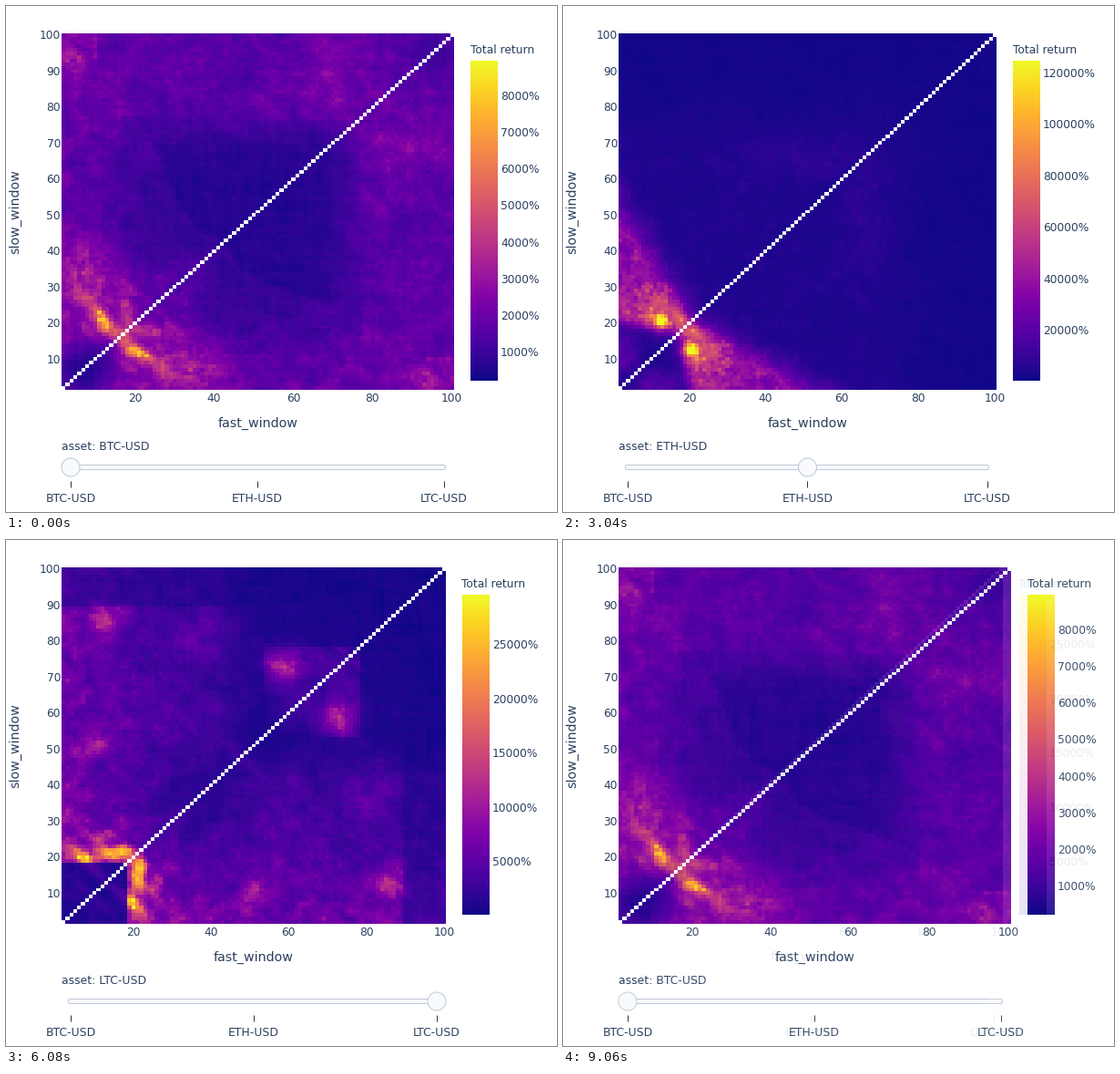
A matplotlib script for the animation above (9.12 s loop, 605 px wide and 555 px high).

```python
import numpy as np
import matplotlib.pyplot as plt
from matplotlib.animation import FuncAnimation
from matplotlib.patches import Circle, FancyBboxPatch

W, H, DPI = 605, 555, 100
PX = 72 / DPI
LOOP, TICK = 9120, 20
FADES, STEP, STEPS = (2500, 5540, 8580), 60, 10
INK, RAIL, LINE = "#2a3f5f", "#f8fafc", "#bec8d9"
LEFT, TOP, BOTTOM = 61, 30, 421
BAR_TOP, BAR_BOTTOM = 60, 411
ASSETS = ("BTC-USD", "ETH-USD", "LTC-USD")

plt.rcParams["font.family"] = "DejaVu Sans"
N = 99
X, Y = np.meshgrid(np.arange(2, N + 2), np.arange(2, N + 2))
rng = np.random.default_rng(7)


def sig(d, width):
    return 1 / (1 + np.exp(-np.clip(d / width, -40, 40)))


def hill(x, y, sx, sy, power=2):
    return np.exp(-np.abs((X - x) / sx) ** power - np.abs((Y - y) / sy) ** power)


def smooth(a, r, axis):
    k = np.hanning(2 * r + 3)[1:-1]
    return np.apply_along_axis(np.convolve, axis, a, k, mode="same")


def noise(rx, ry):
    a = rng.normal(size=(N + 60, N + 60))
    a = smooth(smooth(a, rx, 1), ry, 0)[30:-30, 30:-30]
    return a / a.std()


def waves(r):
    """Ripples running across the diagonal."""
    w = smooth(rng.normal(size=260), r, 0)
    return (w / w.std())[X + Y + 20]


def finish(z, grain, clump, streak):
    """Add texture, then mirror the upper half across the diagonal."""
    rough = 0.6 * (noise(0, 0) + noise(1, 1))
    cloud = 0.8 * noise(3, 3) + 0.4 * waves(2) * noise(8, 8)
    z = z * np.exp(grain * rough + clump * cloud)
    z = np.clip(z + streak * (noise(0, 9) + noise(9, 0)), 0, 1)
    return np.where(X < Y, z, z.T)


def btc():
    edge = np.interp(Y, [42, 46, 66, 88, 92], [44, 35, 26, 16, 10])
    basin = hill(50, 54, 42, 22, 4) * (0.7 + 0.3 * (Y < 76.5))
    z = 0.19 - 0.12 * basin - 0.03 * (X > edge)
    z += 0.1 * hill(5, 96, 4, 10) + 0.06 * hill(70, 88, 9, 12) - 0.06 * hill(95, 97, 9, 8)
    # bright lobe with a crest falling towards the diagonal
    z += 0.2 * hill(8, 30, 8, 13) + 0.2 * hill(18, 25, 2, 7) + 0.35 * hill(16.5, 18, 2.5, 2)
    z += 0.58 * np.exp(-((X + Y - 33) / 2.6) ** 2 - ((X - 11.5) / 3.5) ** 2)
    z -= 0.16 * hill(8, 9, 8, 6)
    return finish(z, 0.13, 0.1, 0.005)


def eth():
    inside = 31.4 - 0.52 * Y - X
    lobe = sig(inside, 1.8) * sig(Y - 21 + X / 4, 0.9)
    z = 0.01 + 0.02 * sig(78 - Y, 4) + 0.03 * hill(50, 66, 16, 6)
    z += lobe * (0.17 + 0.16 * sig(40 - Y, 5)) + 0.12 * hill(3, 12, 4, 6)
    z += 0.5 * hill(13, 20.5, 2, 1.4) + 0.25 * hill(13, 24, 4, 3) + 0.3 * hill(18, 20, 2, 3)
    return finish(z, 0.16, 0.12, 0.0015)


def ltc():
    z = 0.02 + 0.19 * np.exp(-X / 38) * (1 - 0.55 * (Y > 89.5))
    z *= 1 - 0.5 * sig(X - 46, 2)
    z += 0.07 * hill(66, 66, 12.5, 12.5, 40) * sig(X + Y - 122, 2)
    z += 0.12 * hill(59, 73, 5, 6) + 0.09 * hill(37, 83, 5, 6)
    z += 0.12 * hill(13, 83, 6, 6) + 0.1 * hill(10, 50, 5, 5)
    z -= 0.04 * hill(34, 38, 8, 7)
    # bright shelf just above a dark corner block
    z *= 1 - 0.75 * (Y < 18.5)
    z += (0.1 + 0.032 * X) * hill(9, 21, 11, 2.2, 4) * (Y > 18.5)
    z += 0.12 * hill(11, 26, 12, 4) * (Y > 18.5)
    return finish(z, 0.15, 0.2, 0.004)


fig = plt.figure(figsize=(W / DPI, H / DPI), dpi=DPI, facecolor="white")
ax = fig.add_axes([0, 0, 1, 1])
plasma = plt.get_cmap("plasma")


def label(x, y, text, size=12.2, ha="left", **kw):
    ax.text(x, y, text, fontsize=size * PX, color=INK, ha=ha, va="baseline", **kw)


def picture(rgba, x0, x1, bottom, top):
    ax.imshow(rgba, extent=(x0, x1, bottom, top), origin="lower",
              aspect="auto", interpolation="nearest")


def snapshot(index, z, right, low, high, step):
    """Render one slider position and return it as an RGB array."""
    ax.clear()
    ax.axis("off")
    width = right - LEFT
    rgba = plasma(z)
    rgba[np.diag_indices(N)] = 1
    picture(rgba, LEFT, right, BOTTOM, TOP)

    bar = int(right + 18.5)
    picture(plasma(np.linspace(0, 1, 351))[:, None], bar, bar + 30, BAR_BOTTOM, BAR_TOP)
    label(bar - 0.5, 52, "Total return")
    for v in range(step, int(high), step):
        y = BAR_BOTTOM - (BAR_BOTTOM - BAR_TOP) * (v - low) / (high - low)
        label(bar + 33, y + 4.5, f"{v}%")

    for v in range(10, 101, 10):
        label(60, BOTTOM - (v - 1.5) * (BOTTOM - TOP) / N + 4.3, str(v), ha="right")
    for v in range(20, 101, 20):
        label(LEFT + (v - 1.5) * width / N, 434, str(v), ha="center")
    label(LEFT + width / 2, 462, "fast_window", 14.2, "center")
    label(14, 225.5, "slow_window", 14.2, "center", rotation=90, rotation_mode="anchor")

    label(LEFT, 487, f"asset: {ASSETS[index]}", 12.4)
    end = int(right) - 10.5
    style = dict(facecolor=RAIL, edgecolor=LINE, linewidth=PX)
    ax.add_patch(FancyBboxPatch((68.5, 503.5), end + 2 - 68.5, 5,
                                boxstyle="round,pad=0,rounding_size=2", **style))
    stops = np.linspace(70.5, end, 3)
    for x, name in zip(stops, ASSETS):
        ax.plot([x, x], [521, 528], color="#333333", lw=PX, solid_capstyle="butt")
        label(x + 0.5, 544, name, 12.4, "center")
    ax.add_patch(Circle((stops[index] + 0.5, 506), 10, zorder=5, **style))

    ax.set_xlim(0, W)
    ax.set_ylim(H, 0)
    fig.canvas.draw()
    return np.array(fig.canvas.buffer_rgba())[..., :3].astype(float)


shots = [
    snapshot(0, btc(), 491.5, 215, 8959, 1000),
    snapshot(1, eth(), 476, 320, 124800, 20000),
    snapshot(2, ltc(), 483, 126, 29620, 5000),
]
ax.remove()
screen = fig.figimage(shots[0].astype(np.uint8), origin="upper")


def update(i):
    t = i * TICK
    done = sum(min(max((t - start) // STEP + 1, 0), STEPS) for start in FADES)
    k, part = divmod(done, STEPS)
    now, then = shots[k % 3], shots[(k + 1) % 3]
    mixed = now + (then - now) * part / STEPS
    screen.set_data(np.round(mixed).astype(np.uint8))
    return [screen]


anim = FuncAnimation(fig, update, frames=LOOP // TICK, interval=TICK,
                     repeat=True, repeat_delay=0)
plt.show()
```
